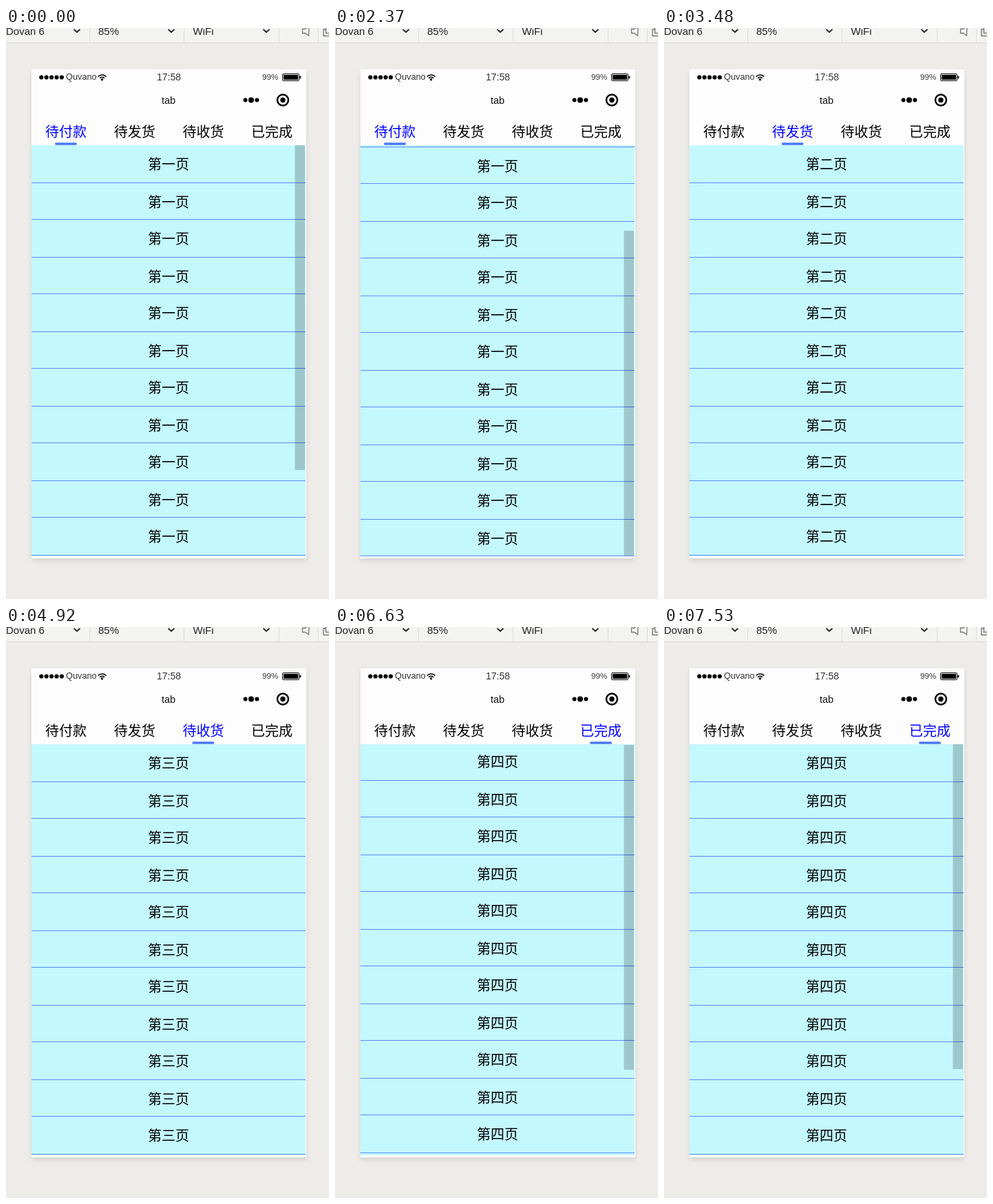
Write an HTML page with a canvas that moves like this. It is 469 px wide and 828 px high and loops after 8 s.

```html
<!DOCTYPE html>
<html lang="zh-CN">
<head>
<meta charset="utf-8">
<title>Tabs</title>
<style>
  html, body { margin: 0; width: 100%; height: 100%; overflow: hidden; background: #edece8; }
  canvas { display: block; width: 469px; height: 828px; }
</style>
</head>
<body>
<canvas id="stage"></canvas>
<script>
const W = 469, H = 828, LOOP = 8000, STEP = 30;
const LATIN = '"Liberation Sans", Arial, sans-serif';
const CJK = '"Noto Sans CJK SC", "Noto Sans CJK", sans-serif';
const TABS = ['待付款', '待发货', '待收货', '已完成'];
const PAGES = ['第一页', '第二页', '第三页', '第四页'];
const view = { x: 37, y: 170, w: 398, h: 596 };
const ROW = 54, ROWS = 14;
const MAX_SCROLL = ROW * ROWS + 1 - view.h;
const THUMB = 471;

const canvas = document.getElementById('stage');
const ctx = canvas.getContext('2d');
const dpr = window.devicePixelRatio || 1;
canvas.width = W * dpr;
canvas.height = H * dpr;

// Eased progress from 0 to 1 between two times
function ease(t, from, to, power) {
  const u = Math.min(1, Math.max(0, (t - from) / (to - from)));
  return u < 0.5
    ? Math.pow(2 * u, power) / 2
    : 1 - Math.pow(2 - 2 * u, power) / 2;
}

function rect(x, y, w, h, color) {
  ctx.fillStyle = color;
  ctx.fillRect(x, y, w, h);
}

function disc(x, y, r, color) {
  ctx.fillStyle = color;
  ctx.beginPath();
  ctx.arc(x, y, r, 0, Math.PI * 2);
  ctx.fill();
}

function pill(x, y, w, h, r, color) {
  ctx.fillStyle = color;
  ctx.beginPath();
  ctx.roundRect(x, y, w, h, r);
  ctx.fill();
}

function line(points, color, width) {
  ctx.strokeStyle = color;
  ctx.lineWidth = width;
  ctx.beginPath();
  points.forEach(([x, y]) => ctx.lineTo(x, y));
  ctx.stroke();
}

function text(str, x, y, size, family, color, align = 'left') {
  ctx.font = `${size}px ${family}`;
  ctx.fillStyle = color;
  ctx.textAlign = align;
  ctx.fillText(str, x, y);
}

function drawToolbar() {
  rect(0, 0, W, 21, '#f3f3f2');
  rect(0, 21, W, 1, '#d6d6d4');
  for (const x of [121, 258, 396, 453]) rect(x, 0, 1, 21, '#dcdcda');
  text('Dovan 6', 0, 10, 15, LATIN, '#222');
  text('85%', 134, 10, 15, LATIN, '#222');
  text('WiFi', 271.5, 10, 15, LATIN, '#222');
  for (const x of [103, 240, 378]) {
    line([[x - 4.5, 2], [x, 6], [x + 4.5, 2]], '#222', 1.8);
  }
  // Speaker
  line([[440, -2], [439.5, 11], [434.5, 7.5], [430.5, 7.5], [430.5, 1.5], [434.5, 1.5], [439, -2]], '#777', 1.3);
  // Overlapping windows
  ctx.strokeStyle = '#777';
  ctx.lineWidth = 1.4;
  ctx.strokeRect(464.5, -3, 10, 10.5);
  line([[464, 2], [461, 2], [461, 11.5], [470, 11.5]], '#777', 1.4);
}

function drawPhone() {
  ctx.save();
  ctx.shadowColor = 'rgba(0,0,0,0.1)';
  ctx.shadowBlur = 7 * dpr;
  ctx.shadowOffsetY = 4 * dpr;
  rect(37, 60, 399, 709, '#fdfdfd');
  ctx.restore();
}

function drawStatus() {
  for (let i = 0; i < 5; i++) disc(51.3 + i * 7.4, 71.5, 3.1, '#000');
  text('Quvano', 87, 75, 12.75, LATIN, '#333');
  ctx.strokeStyle = '#000';
  ctx.lineWidth = 1.7;
  for (const r of [4.6, 8]) {
    ctx.beginPath();
    ctx.arc(139.5, 76, r, -Math.PI * 0.76, -Math.PI * 0.24);
    ctx.stroke();
  }
  disc(139.5, 74.8, 1.7, '#000');
  text('17:58', 236.5, 76, 14, LATIN, '#333', 'center');
  text('99%', 372, 75, 11.7, LATIN, '#333');
  ctx.lineWidth = 1;
  ctx.beginPath();
  ctx.roundRect(401.5, 66.5, 24, 10, 1.5);
  ctx.stroke();
  rect(403, 68, 21, 7, '#000');
  pill(426.5, 69.5, 1.8, 4, 0.8, '#000');

  text('tab', 236, 110, 14.5, LATIN, '#111', 'center');
  disc(347.6, 104.5, 3, '#000');
  disc(356, 104.5, 4, '#000');
  disc(364.4, 104.5, 3, '#000');
  ctx.lineWidth = 2.4;
  ctx.beginPath();
  ctx.arc(402, 104.5, 8, 0, Math.PI * 2);
  ctx.stroke();
  disc(402, 104.5, 3.7, '#000');
}

function drawTabs(active) {
  TABS.forEach((label, i) => {
    const x = 87 + i * 99.7;
    text(label, x, 158, 20, CJK, i === active ? '#0000ff' : '#000', 'center');
    if (i === active) pill(x - 16, 166.3, 32, 3.4, 1.7, '#4a7af5');
  });
}

function drawPage(i, left, scroll, hasBar) {
  rect(left, view.y, view.w, view.h, '#c4f8ff');
  for (let r = 0; r < ROWS; r++) {
    const y = view.y + r * ROW - Math.round(scroll);
    // Every second row is rounded inwards by a pixel
    const snap = r % 2;
    text(PAGES[i], left + 199, y + 35 + snap, 20, CJK, '#000', 'center');
    rect(left, y + ROW - snap, view.w, 1, '#5a8bf8');
  }
  if (hasBar) {
    const y = view.y + Math.floor((view.h - THUMB) * scroll / MAX_SCROLL);
    rect(left + 382.5, y, 14.5, THUMB, 'rgba(0,0,0,0.2)');
  }
}

function draw(t) {
  const pos = ease(t, 3240, 3480, 2) + ease(t, 4590, 4920, 2) + ease(t, 6060, 6270, 2);
  const scrolls = [
    ease(t, 1470, 1680, 3) - ease(t, 2340, 2580, 3), 0, 0,
    ease(t, 6600, 6870, 2.5) - ease(t, 7320, 7530, 3)
  ];
  const bars = [true, false, false, t >= 6630];

  ctx.setTransform(dpr, 0, 0, dpr, 0, 0);
  rect(0, 0, W, H, '#edece8');
  drawToolbar();
  drawPhone();
  drawStatus();
  drawTabs(Math.round(pos));

  ctx.save();
  ctx.beginPath();
  ctx.rect(view.x, view.y, view.w, view.h);
  ctx.clip();
  PAGES.forEach((_, i) => {
    const shift = Math.round((i - pos) * view.w);
    if (Math.abs(shift) < view.w) drawPage(i, view.x + shift, scrolls[i] * MAX_SCROLL, bars[i]);
  });
  ctx.restore();
}

const start = performance.now();
function tick() {
  const t = (performance.now() - start) % LOOP;
  draw(Math.floor(t / STEP) * STEP);
  requestAnimationFrame(tick);
}
tick();
</script>
</body>
</html>
```
